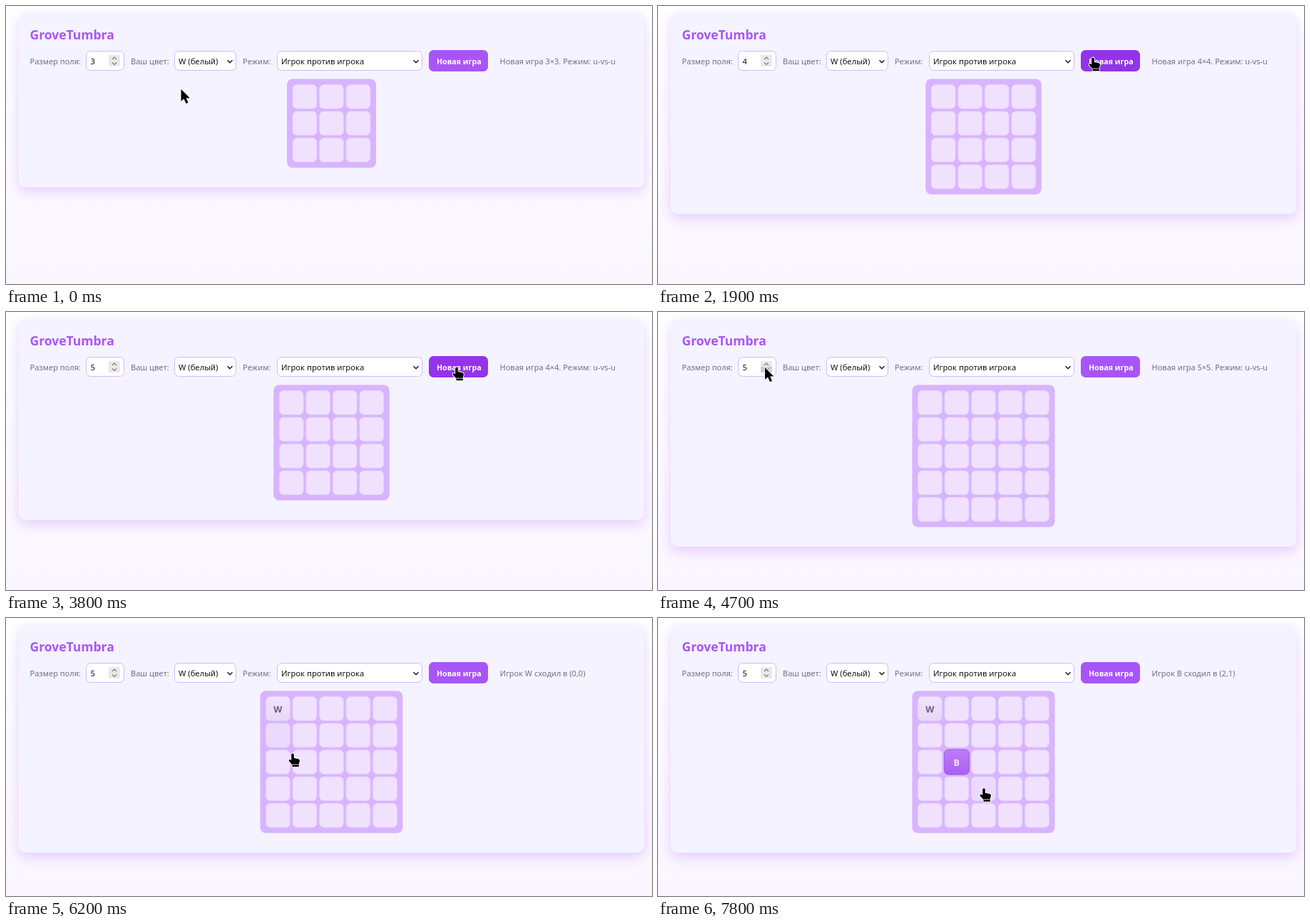
An HTML page for the animation above (8 s loop, 906 by 391 pixels).

```html
<!DOCTYPE html>
<html lang="ru">
<head>
<meta charset="utf-8">
<title>GroveTumbra</title>
<style>
  html, body { margin: 0; width: 100%; height: 100%; overflow: hidden; }
  body { background: linear-gradient(#fff, #faf5ff); }
  svg { display: block; width: 906px; height: 391px; font: 11px "Noto Sans", sans-serif; }
  .card { fill: #f5f3ff; filter: drop-shadow(0 6px 9px rgba(168, 85, 247, .26)); }
  .title { font-size: 17.5px; font-weight: 700; fill: #a855f7; }
  .label { fill: #6b7280; }
  .value { font-size: 11.2px; fill: #111; }
  .field { fill: #fff; stroke: #d8b4fe; }
  .chevron { fill: none; stroke: #222; stroke-width: 1.6; }
  .spin { fill: none; stroke: #777; stroke-width: 1.1; }
  .caption { font-size: 10.6px; font-weight: 700; fill: #fff; }
  .board { fill: #d8b4fe; }
  .piece { font-size: 12.5px; font-weight: 700; text-anchor: middle; }
  .cursor { stroke: #fff; stroke-width: 1.8; stroke-linejoin: round; paint-order: stroke; }
</style>
</head>
<body>
<svg viewBox="0 0 906 391">
  <defs>
    <linearGradient id="white" x2="0" y2="1">
      <stop stop-color="#f1e4fe"/><stop offset="1" stop-color="#e8d7f8"/>
    </linearGradient>
    <linearGradient id="black" x2="0" y2="1">
      <stop stop-color="#bd7cfa"/><stop offset="1" stop-color="#ab61f0"/>
    </linearGradient>
  </defs>
  <rect id="card" class="card" x="18" y="10" width="877" rx="9.5"/>
  <text class="title" x="33.5" y="47">GroveTumbra</text>

  <g class="label">
    <text x="33.5" y="82">Размер поля:</text>
    <text x="175" y="82">Ваш цвет:</text>
    <text x="332" y="82">Режим:</text>
    <text id="status" x="692.5" y="82"></text>
  </g>
  <g class="field">
    <rect x="112.5" y="63.5" width="53" height="27" rx="6"/>
    <rect x="236.5" y="63.5" width="86" height="27" rx="6"/>
    <rect x="380.5" y="63.5" width="203" height="27" rx="6"/>
  </g>
  <g class="value">
    <text id="size" x="118.5" y="82"></text>
    <text x="242" y="82">W (белый)</text>
    <text x="386" y="82">Игрок против игрока</text>
  </g>
  <rect id="up" x="144" y="69" width="16" height="8"/>
  <rect id="down" x="144" y="77" width="16" height="8"/>
  <path class="spin" d="M149 75l3-3 3 3M149 79.5l3 3 3-3"/>
  <path class="chevron" d="M310.5 76.2l3.5 3.5 3.5-3.5M571.5 76.2l3.5 3.5 3.5-3.5"/>
  <rect id="button" x="593" y="62" width="83" height="30" rx="6.5"/>
  <text class="caption" x="604" y="82">Новая игра</text>

  <rect id="board" class="board" rx="8"/>
  <g id="cells"></g>
  <text id="w" class="piece" x="381.2" y="132.5" fill="#6b5a80">W</text>
  <text id="b" class="piece" x="418.7" y="207.5" fill="#f3e8ff">B</text>

  <path id="arrow" class="cursor" d="M0 0V17L4 13.5 7 20.3 10 19 7.2 12.4H12.3Z"/>
  <g id="hand" class="cursor">
    <path d="M-1.8 1.3Q-1.8-.6 0-.6T1.8 1.3V6L8 7.2Q10 7.8 10 10L8.8 14V18.3H-.5V15.5L-5 10.6Q-6 9-4.5 8-3 8-1.8 9.4Z"/>
    <path d="M-.5 15.2H8.8" stroke-width=".8"/>
  </g>
</svg>
<script>
  const LOOP = 8000, STEP = 100;
  const CELL = 34.4, PITCH = 37.53, PAD = 7.8, CENTER = 456.5, TOP = 102.5;
  const MOVE_W = 5900, MOVE_B = 6700;

  // Pointer glides: start, end, x, y; it rests in between
  const glides = [
    [0, 600, 149, 58], [700, 900, 150, 71],       // to the spinner
    [1200, 1800, 610, 73],                        // new game
    [1900, 2500, 137, 60], [2700, 2900, 150, 72], // spinner again
    [3100, 3700, 632, 78],                        // new game
    [3900, 4500, 150, 78],
    [4700, 5500, 424, 140], [5500, 5900, 380, 130], // first cell
    [5900, 6200, 402, 191], [6200, 6600, 418, 206], // second move
    [6700, 7300, 491, 204], [7300, 7800, 457, 240]
  ];

  const $ = id => document.getElementById(id);
  const set = (el, attrs) => { for (const k in attrs) el.setAttribute(k, attrs[k]); };
  const show = (el, on) => { el.style.display = on ? "" : "none"; };
  const smooth = k => k * k * (3 - 2 * k);
  const inside = ([px, py], x, y, w, h) => px >= x && px < x + w && py >= y && py < y + h;
  const overButton = p => inside(p, 593, 62, 83, 30);

  const cells = Array.from({ length: 25 }, () =>
    $("cells").appendChild(document.createElementNS("http://www.w3.org/2000/svg", "rect")));

  function pointer(t) {
    let px = 245.5, py = 117;
    for (const [start, end, x, y] of glides) {
      if (t <= start) break;
      const k = smooth(Math.min(1, (t - start) / (end - start)));
      px += (x - px) * k;
      py += (y - py) * k;
    }
    return [px, py];
  }

  function status(t, n) {
    if (t >= MOVE_B) return "Игрок B сходил в (2,1)";
    if (t >= MOVE_W) return "Игрок W сходил в (0,0)";
    return `Новая игра ${n}×${n}. Режим: u-vs-u`;
  }

  function render(t) {
    const pos = pointer(t), hovered = pointer(t - STEP); // hover lags one step
    const n = 3 + (t >= 1800) + (t >= 3900);
    const side = 2 * PAD + (n - 1) * PITCH + CELL, left = CENTER - side / 2;

    $("status").textContent = status(t, n);
    $("size").textContent = 3 + (t >= 1100) + (t >= 3100);
    set($("card"), { height: 245 + (n - 3) * PITCH });
    set($("board"), { x: left, y: TOP, width: side, height: side });
    for (const [id, y] of [["up", 69], ["down", 77]])
      set($(id), { fill: inside(pos, 144, y, 16, 8) ? "#cbcbd0" : "#e9e9ed" });
    set($("button"), { fill: overButton(hovered) ? "#9333ea" : "#a855f7" });

    let clickable = overButton(pos);
    cells.forEach((cell, i) => {
      show(cell, i < n * n);
      if (i >= n * n) return;
      const x = left + PAD + i % n * PITCH, y = TOP + PAD + Math.floor(i / n) * PITCH;
      const white = i === 0 && t >= MOVE_W, black = i === 11 && t >= MOVE_B;
      const inset = black ? -.4 : .4, size = CELL - 2 * inset;
      clickable ||= inside(pos, x, y, CELL, CELL);
      set(cell, {
        x: x + inset, y: y + inset, width: size, height: size, rx: 6,
        fill: white ? "url(#white)" : black ? "url(#black)"
          : inside(hovered, x, y, CELL, CELL) ? "#ebdafe" : "#f0e1ff",
        stroke: black ? "#9a4de6" : "#e9d5ff", "stroke-width": .8
      });
    });
    show($("w"), t >= MOVE_W);
    show($("b"), t >= MOVE_B);

    show($("hand"), clickable);
    show($("arrow"), !clickable);
    set($(clickable ? "hand" : "arrow"), { transform: `translate(${pos})` });
  }

  function tick(now) {
    render(Math.floor(now % LOOP / STEP) * STEP);
    requestAnimationFrame(tick);
  }
  requestAnimationFrame(tick);
</script>
</body>
</html>
```
